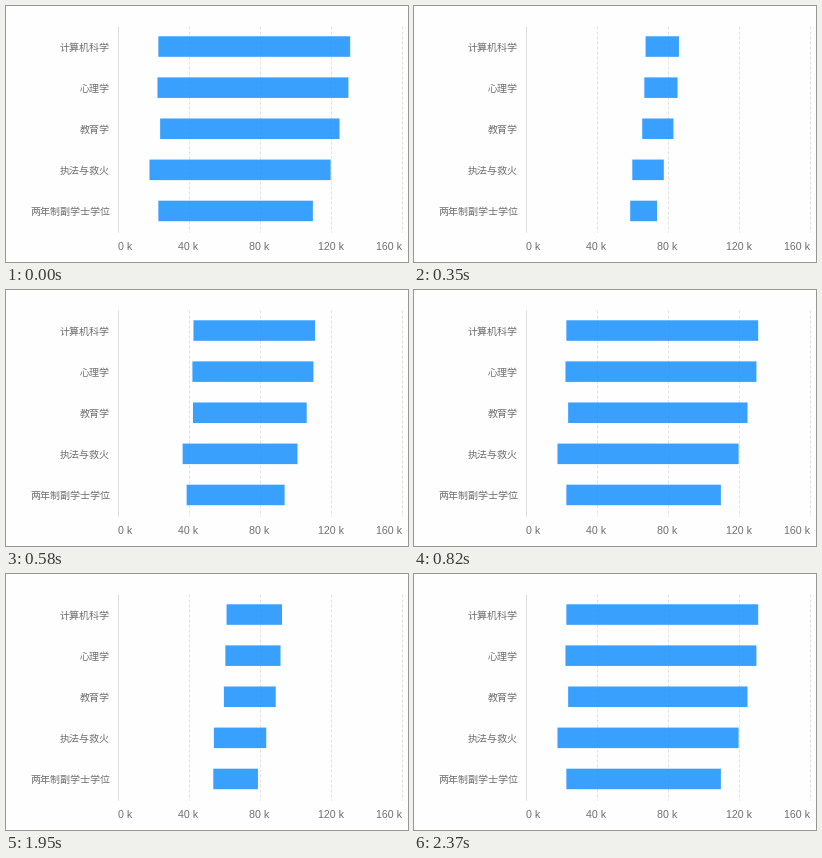
A matplotlib script for the animation above (3390 ms loop, 402 by 256 pixels).

```python
import matplotlib.pyplot as plt
from matplotlib.animation import FuncAnimation
from matplotlib.patches import Rectangle

W, H, DPI = 402, 256, 64
LOOP, TICK = 3390, 10
LEFT, RIGHT, TOP, BOTTOM = 111.5, 395.7, 20, 225.5
BAND = (BOTTOM - TOP) / 5
TEXT = "#707070"

# label, low and high value in thousands
ROWS = [
    ("计算机科学", 23, 131),
    ("心理学", 22.5, 130),
    ("教育学", 24, 125),
    ("执法与救火", 18, 120),
    ("两年制副学士学位", 23, 110),
]

# each run: time the chart clears, times of the redraws, first growth step
RUNS = [
    (240, [290, 350, 410, 470, 520, 580, 640, 700, 760, 820], -1),
    (1770, list(range(1890, 2371, 60)), 0),
]


def px(size):
    return size * 72 / DPI


def x_of(value):
    return LEFT + (RIGHT - LEFT) * value / 160


fig = plt.figure(figsize=(W / DPI, H / DPI), dpi=DPI, facecolor="#fefefe")
ax = fig.add_axes([0, 0, 1, 1])
ax.set_xlim(0, W)
ax.set_ylim(H, 0)
ax.axis("off")

ax.plot([LEFT, LEFT], [TOP, BOTTOM], color="#dedede", lw=px(1),
        solid_capstyle="butt", zorder=1)

for value, align in zip(range(0, 161, 40),
                        ["left", "center", "center", "center", "right"]):
    x = x_of(value)
    if value:
        ax.plot([x, x], [TOP, BOTTOM], color="#e2e2e2", lw=px(1),
                ls=(0, (3, 2)), dash_capstyle="butt", zorder=1)
    ax.text(x, 244, f"{value} k", ha=align, va="baseline", color=TEXT,
            family="Liberation Sans", size=px(10.6))

bars = []
for i, (label, low, high) in enumerate(ROWS):
    mid = TOP + BAND * (i + 0.5)
    ax.text(104, mid + 4, label, ha="right", va="baseline", color=TEXT,
            family="Noto Sans CJK JP", size=px(10))
    bar = Rectangle((x_of(low), mid - BAND / 4), x_of(high) - x_of(low),
                    BAND / 2, fc="#1890ff", alpha=0.85, lw=0, zorder=2)
    bar.set_snap(False)
    bars.append(ax.add_patch(bar))


def growth(t):
    """Share of full bar length at t, or None while the chart is blank."""
    share = 1
    for clear, times, first in RUNS:
        if t >= clear:
            done = sum(t >= start for start in times)
            share = min(1, 0.174 + 0.115 * (first + done - 1)) if done else None
    return share


def update(n):
    share = growth(n * TICK)
    ax.set_visible(share is not None)
    if share is not None:
        for bar, (_, low, high) in zip(bars, ROWS):
            width = (x_of(high) - x_of(low)) * share
            bar.set_x(x_of((low + high) / 2) - width / 2)
            bar.set_width(width)
    return bars


anim = FuncAnimation(fig, update, frames=LOOP // TICK, interval=TICK,
                     repeat=True, repeat_delay=0, blit=False)
plt.show()
```
